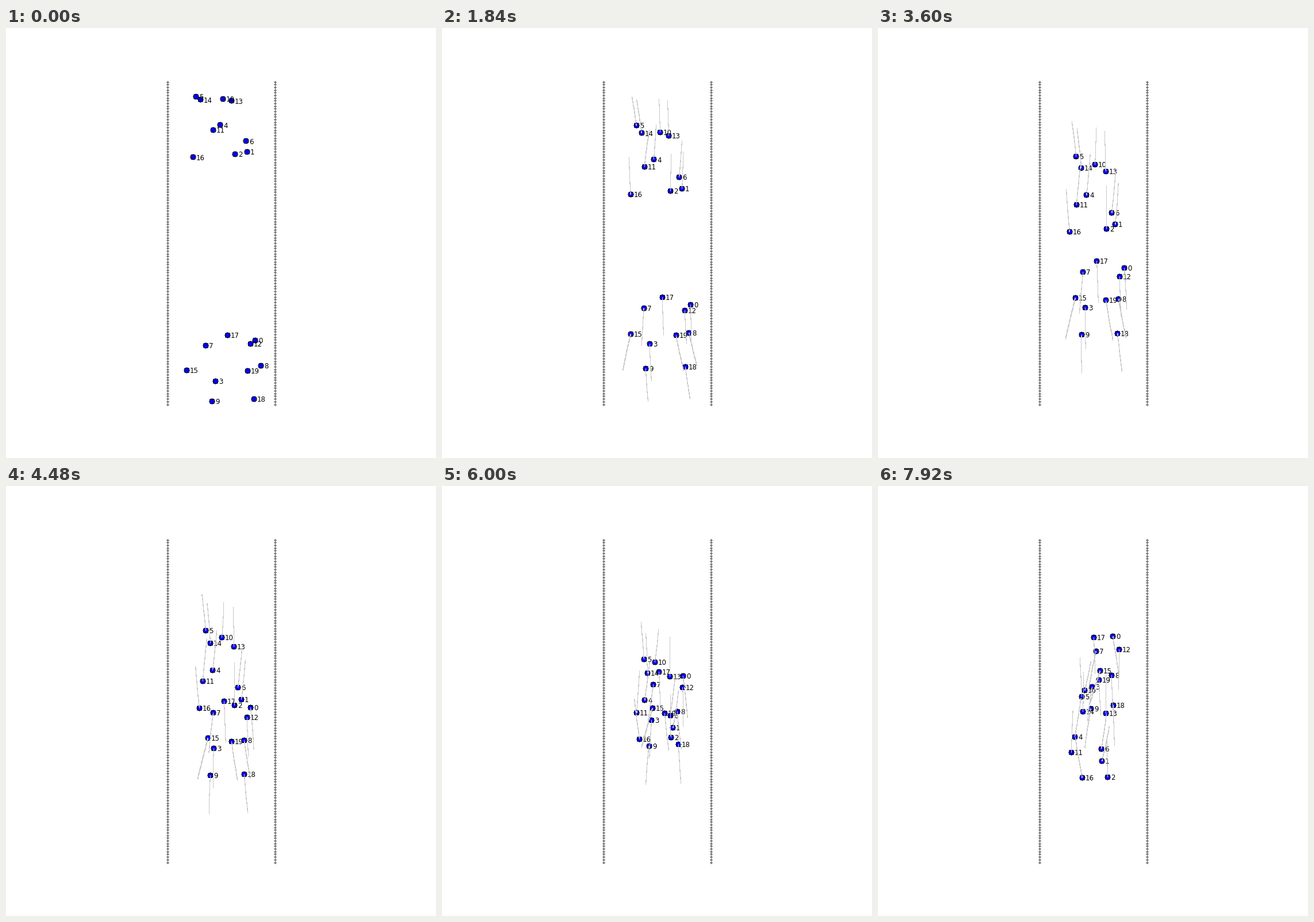
Animation, 748 px wide and 748 px high, one loop 8 s. Source, as a matplotlib script:

```python
import numpy as np
import matplotlib.pyplot as plt
from matplotlib.animation import FuncAnimation
from matplotlib.collections import LineCollection, PolyCollection

SIZE, DPI = 748, 100
FRAMES, INTERVAL = 100, 80
TRAIL = 25
STARTUP = 1.6  # frames lost while a walker picks up speed
PT = 72 / DPI  # points per pixel

# Key points of each walker: where it starts, meets the others and ends.
KEY_FRAMES = [0, 56, 99]
WALKERS = [
    [(433, 543), (425, 385), (408, 261)],
    [(419, 215), (409, 371), (389, 478)],
    [(398, 219), (397, 381), (399, 506)],
    [(364, 614), (361, 456), (372, 349)],
    [(372, 168), (359, 320), (342, 436)],
    [(330, 119), (347, 251), (354, 366)],
    [(417, 196), (403, 350), (388, 457)],
    [(347, 552), (360, 394), (379, 287)],
    [(443, 587), (414, 442), (406, 329)],
    [(358, 649), (355, 503), (370, 387)],
    [(377, 123), (375, 263), (359, 355)],
    [(360, 177), (342, 339), (336, 463)],
    [(425, 549), (419, 402), (419, 284)],
    [(392, 126), (396, 279), (396, 395)],
    [(338, 124), (355, 273), (356, 392)],
    [(314, 595), (351, 438), (386, 321)],
    [(325, 224), (336, 386), (355, 507)],
    [(385, 534), (379, 374), (375, 263)],
    [(431, 645), (414, 501), (409, 381)],
    [(420, 596), (392, 444), (384, 337)],
]


def walk(keys):
    """Parabola through the key points, begun from standstill."""
    t = np.arange(FRAMES)
    progress = t - STARTUP * (1 - np.exp(-t / STARTUP))
    curve = np.polyfit(progress[KEY_FRAMES], np.array(keys), 2)
    return np.stack([np.polyval(c, progress) for c in curve.T], axis=1).round()


def pixel_disc(half_widths):
    """Stepped outline of a disc, given the half width of each row from the middle."""
    quarter = np.array([(w + 0.5, row + side) for row, w in enumerate(half_widths)
                        for side in (-0.5, 0.5)])
    quarter[0, 1] = 0
    half = np.vstack([quarter, quarter[::-1] * (-1, 1)])
    return np.vstack([half, half[::-1] * (1, -1)])


RIM = pixel_disc([5, 4, 4, 4, 3, 0])
CORE = pixel_disc([3, 3, 3, 3])
BEAD = pixel_disc([2, 1, 0])

paths = np.array([walk(keys) for keys in WALKERS])

fig = plt.figure(figsize=(SIZE / DPI, SIZE / DPI), dpi=DPI, facecolor="white")
ax = fig.add_axes([0, 0, 1, 1])
ax.set_xlim(-0.5, SIZE - 0.5)
ax.set_ylim(SIZE - 0.5, -0.5)
ax.axis("off")


def add_shapes(shapes, colors, zorder):
    return ax.add_collection(PolyCollection(
        shapes, facecolors=colors, edgecolors="none", linewidths=0,
        antialiaseds=False, zorder=zorder), autolim=False)


wall_y = np.floor(np.linspace(SIZE / 8, SIZE * 7 / 8, 121) + 0.5)
add_shapes([BEAD + (x, y) for x in (281, 468) for y in wall_y], "#808080", 1)

dots = add_shapes([], ["black", "#0000ff"] * len(paths), 2)
labels = [ax.text(0, 0, str(k), family="DejaVu Sans", size=11.8 * PT,
                  color="black", zorder=3) for k in range(len(paths))]
trails = LineCollection([], colors="#c8c8c8", linewidths=PT,
                        antialiaseds=False, zorder=4)
ax.add_collection(trails, autolim=False)


def update(n):
    now = paths[:, n]
    dots.set_verts([shape + p for p in now for shape in (RIM, CORE)])
    for label, (x, y) in zip(labels, now):
        label.set_position((x + 5.5, y + 5))
    trails.set_segments(list(paths[:, max(0, n - TRAIL):n + 1]) if n else [])
    return [dots, *labels, trails]


anim = FuncAnimation(fig, update, frames=FRAMES, interval=INTERVAL,
                     repeat=True, repeat_delay=0)
plt.show()
```
